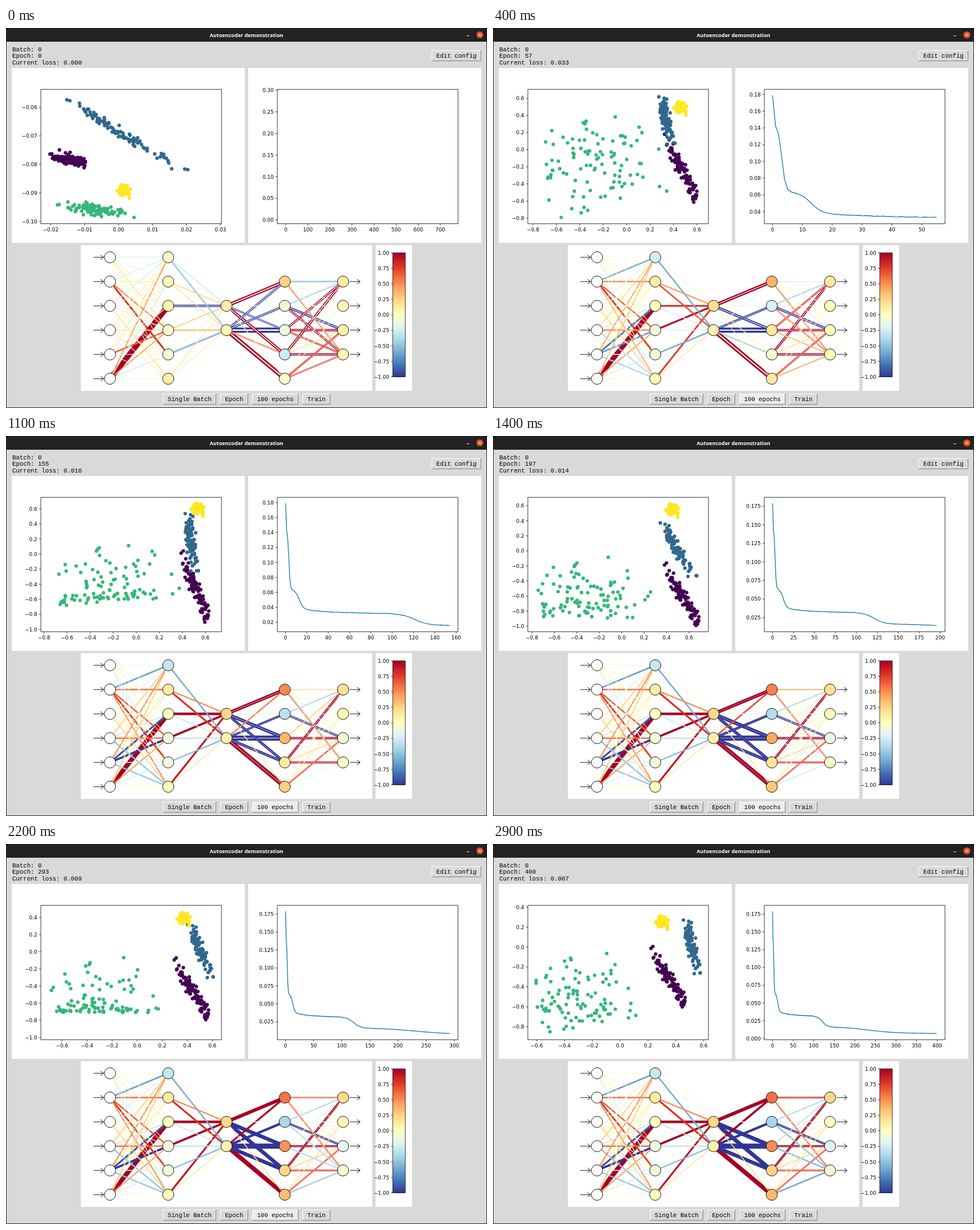
Recreate the animation shown at these times as an HTML page with a canvas. Size 842x665 px, loop 3 s.

```html
<!DOCTYPE html>
<html lang="en">
<head>
<meta charset="utf-8">
<title>Autoencoder demonstration</title>
<style>
html, body { margin: 0; width: 842px; height: 665px; overflow: hidden; background: #d9d9d9; }
canvas, svg { position: absolute; left: 0; top: 0; }
text { font: 10.7px "Liberation Mono", monospace; white-space: pre; }
.title { font: bold 9.1px "Noto Sans", sans-serif; fill: #fff; }
</style>
</head>
<body>
<canvas id="plots" width="842" height="665"></canvas>
<svg id="ui" width="842" height="665">
  <path d="M.5 24V664.5H841.5V24" fill="none" stroke="#222"/>
  <rect width="842" height="24" fill="#000"/>
  <path d="M0 24V6Q0 0 6 0H836Q842 0 842 6V24Z" fill="#222"/>
  <text class="title" x="421" y="16" text-anchor="middle">Autoencoder demonstration</text>
  <path d="M806 13.5h5" stroke="#ddd"/>
  <circle cx="829.5" cy="12" r="6" fill="#e95420"/>
  <path d="M827.3 9.8l4.4 4.4m0-4.4l-4.4 4.4" stroke="#fff"/>
  <text x="11" y="41">Batch: 0</text>
  <text id="epoch" x="11" y="52"></text>
  <text id="loss" x="11" y="63.5"></text>
</svg>
<script>
const $ = id => document.getElementById(id);
const g = $('plots').getContext('2d');
const lerp = (a, b, p) => a + (b - a) * p;
const range = (a, b) => Array.from({ length: b - a + 1 }, (_, i) => a + i);

function rng(seed) {
  return () => {
    seed = seed + 0x6D2B79F5 | 0;
    let t = Math.imul(seed ^ seed >>> 15, 1 | seed);
    t = t + Math.imul(t ^ t >>> 7, 61 | t) ^ t;
    return ((t ^ t >>> 14) >>> 0) / 4294967296;
  };
}

// Linear interpolation between key values, numbers or arrays.
function mix(times, keys, s) {
  let k = 0;
  while (k < times.length - 2 && s >= times[k + 1]) k++;
  const p = Math.max(0, Math.min(1, (s - times[k]) / (times[k + 1] - times[k])));
  const a = keys[k], b = keys[k + 1];
  return Array.isArray(a) ? a.map((v, i) => lerp(v, b[i], p)) : lerp(a, b, p);
}

/* ---- buttons ---- */
function button(label, x, y, w) {
  const h = 19;
  $('ui').insertAdjacentHTML('beforeend',
    `<g><rect x="${x}" y="${y}" width="${w}" height="${h}" fill="#d9d9d9"/>
    <path d="M${x + .5} ${y + h}V${y + .5}H${x + w}" fill="none" stroke="#fff"/>
    <path d="M${x} ${y + h - .5}H${x + w - .5}V${y}" fill="none" stroke="#828282"/>
    <text x="${x + w / 2}" y="${y + 13}" text-anchor="middle">${label}</text></g>`);
  return $('ui').lastElementChild.firstElementChild;
}
button('Edit config', 745, 39, 87);
button('Single Batch', 275, 640, 93);
button('Epoch', 375, 640, 49);
const runButton = button('100 epochs', 431, 640, 81);
button('Train', 519, 640, 49);

/* ---- training progress ---- */
const epochAt = s => Math.ceil(mix([0, 14, 18, 22, 29], [0, 197, 225, 293, 400], s));

// Loss: slow decays plus four smooth drops (height, epoch, softness).
const drops = [[.078, 3.1, .6], [.023, 13, 1.8], [.0148, 121, 6], [.0072, 235, 30]];
const lossAt = e => .0055 + .035 * Math.exp(-4 * e) + .01 * Math.exp(-e / 20) + .006 * Math.exp(-e / 300)
  + drops.reduce((sum, [h, mid, soft]) => sum + h / (1 + Math.exp((e - mid) / soft)), 0);
const jitter = rng(5);
const losses = range(0, 400).map(e => lossAt(e) * (1 + (e > 20 ? (jitter() - .5) * .02 : 0)));

/* ---- axes ---- */
const ink = '#000';
const num = (v, d) => v.toFixed(d).replace(/^-(0\.?0*)$/, '$1').replace('-', '\u2212');

function line(x0, y0, x1, y1, w, color) {
  g.lineWidth = w;
  g.strokeStyle = color;
  g.beginPath();
  g.moveTo(x0, y0);
  g.lineTo(x1, y1);
  g.stroke();
}
function dot(x, y, r, color) {
  g.fillStyle = color;
  g.beginPath();
  g.arc(x, y, r, 0, 7);
  g.fill();
}
function label(s, x, y, align) {
  g.font = '8.85px "DejaVu Sans", sans-serif';
  g.fillStyle = ink;
  g.textAlign = align;
  g.fillText(s, x, y);
}

function ticks(lo, hi) {
  const raw = (hi - lo) / 9, mag = 10 ** Math.floor(Math.log10(raw));
  const m = [1, 2, 2.5, 5, 10].find(m => m * mag >= raw * .9999), step = m * mag;
  const digits = Math.max(0, -Math.floor(Math.log10(step) + 1e-9) + (m === 2.5 && step < 10 ? 1 : 0));
  return range(Math.ceil(lo / step), Math.floor(hi / step)).map(i => [i * step, num(i * step, digits)]);
}

const boxTop = 107, boxBottom = 342.3, boxWidth = 316.2;
function axes(left, [x0, x1, y0, y1]) {
  const X = v => left + (v - x0) / (x1 - x0) * boxWidth;
  const Y = v => boxBottom - (v - y0) / (y1 - y0) * (boxBottom - boxTop);
  for (const [v, s] of ticks(x0, x1)) {
    line(X(v), boxBottom, X(v), boxBottom + 3.2, .75, ink);
    label(s, X(v), boxBottom + 13.2, 'center');
  }
  for (const [v, s] of ticks(y0, y1)) {
    line(left - 3.2, Y(v), left, Y(v), .75, ink);
    label(s, left - 6.4, Y(v) + 3.3, 'right');
  }
  return [X, Y];
}
function frame(left) {
  g.lineWidth = .8;
  g.strokeStyle = ink;
  g.strokeRect(left, boxTop + .3, boxWidth, boxBottom - boxTop);
}

/* ---- scatter ---- */
const limitT = [0, 4, 8, 14, 18, 22, 29];
const limits = [
  [-.0229, .0303, -.1008, -.0536], [-.844, .698, -.863, .707], [-.819, .706, -.985, .797],
  [-.836, .773, -1.072, .714], [-.82, .743, -1.063, .685], [-.769, .673, -1.023, .543], [-.664, .635, -.929, .42]];

// Keys in data units: centre x, y and one deviation along the long axis.
// Thickness in pixels, untrained and trained.
const cloudT = [0, 4, 8, 14, 29];
const clouds = [
  { color: '#440154', thick: [4.5, 4.5], keys: [[-.0143, -.0783, .0026, -.0007], [.478, -.247, .068, -.184], [.489, -.331, .04, -.235], [.554, -.63, .076, -.19], [.36, -.331, .061, -.136]] },
  { color: '#31688e', thick: [4, 4], keys: [[.0008, -.069, .0082, -.0059], [.337, .353, .022, -.13], [.46, .312, -.036, -.197], [.493, .031, .068, -.169], [.516, .013, .023, -.128]] },
  { color: '#35b779', thick: [4.5, 38], tail: [0, 0, 0, .8, .2], keys: [[-.0067, -.0959, .0045, -.0008], [-.254, -.154, .14, 0], [-.148, -.21, .16, .1], [-.306, -.66, .12, 0], [-.29, -.52, .05, 0]] },
  { color: '#fde725', thick: [5, 5], keys: [[.0014, -.0893, 0, 0], [.454, .487, 0, 0], [.609, .653, 0, 0], [.447, .54, 0, 0], [.298, .248, 0, 0]] }];

const rand = rng(21);
const gauss = () => (rand() + rand() + rand() + rand() - 2) * 1.73;
for (const c of clouds) c.points = range(1, 100).map(() => [gauss(), gauss(), gauss()]);

function scatter(s) {
  const [X, Y] = axes(61, mix(limitT, limits, s));
  for (const { color, thick, tail, keys, points } of clouds) {
    const [cx, cy, dx, dy] = mix(cloudT, keys, s);
    const size = lerp(...thick, Math.min(1, s / 4));
    const skew = tail ? mix(cloudT, tail, s) : 0;
    for (const [a, u, v] of points) {
      const x = X(cx + a * dx) + u * size;
      const y = Y(cy + a * dy) + lerp(v, 1 - 1.4 * Math.abs(v), skew) * size;
      dot(Math.max(75.4, Math.min(362.6, x)), Math.max(118, Math.min(331.5, y)), 3.1, color);
    }
  }
  frame(61);
}

/* ---- loss curve ---- */
function lossPlot(epoch) {
  const last = epoch - (epoch < 100 ? 2 : 1);
  if (last < 1) {
    axes(475, [-38, 780, -.0085, .3025]);
  } else {
    const seen = losses.slice(0, last + 1), low = Math.min(...seen), high = seen[0];
    const pad = (high - low) * .05;
    const [X, Y] = axes(475, [-last * .05, last * 1.05, low - pad, high + pad]);
    g.beginPath();
    seen.forEach((v, i) => g.lineTo(X(i), Y(v)));
    g.lineWidth = 1.35;
    g.lineJoin = 'round';
    g.strokeStyle = '#1f77b4';
    g.stroke();
  }
  frame(475);
}

/* ---- network ---- */
const ramp = ['#313695', '#4575b4', '#74add1', '#abd9e9', '#e0f3f8', '#ffffbf', '#fee090', '#fdae61', '#f46d43', '#d73027', '#a50026'];
const rgb = ramp.map(h => [1, 3, 5].map(i => parseInt(h.slice(i, i + 2), 16)));
const rampT = range(0, 10).map(i => i / 5 - 1);
const tone = v => `rgb(${mix(rampT, rgb, v).map(Math.round)})`;

const colX = l => 182 + l * 102, rowY = r => 401.25 + r * 42.5;
const cols = [range(0, 5), range(0, 5), [2, 3], range(1, 5), range(1, 4)];

// strong: from row, to row, first and trained weight; other weights are random.
// bias: first and trained value of each node the layer leads to.
// tau: learning time; hollow: time until the white core has closed.
const layers = [
  { tau: 2.5, hollow: 0,
    strong: [[5, 2, 3.3, 2.8], [1, 4, .8, .75], [1, 3, .5, .65], [1, 1, .1, .6], [1, 0, -.2, -.65], [4, 3, .65, -1], [4, 2, -.2, -.9],
      [5, 0, .45, .3], [5, 3, .45, .45], [3, 3, .15, .6], [4, 5, -.1, -.5], [3, 5, .1, -.5], [1, 5, -.1, .5]],
    bias: [[-.03, -.3], [.03, .12], [.05, 0], [-.04, -.1], [-.07, -.1], [.1, 0]] },
  { tau: 2.5, hollow: 4,
    strong: [[0, 3, -.55, -.6], [1, 3, .2, .8], [2, 2, -1.1, 1.3], [3, 2, .3, 1.1], [3, 3, .4, -.35], [4, 3, -.7, -.55], [5, 2, .15, .9]],
    bias: [[.12, .23], [.04, .08]] },
  { tau: 8, hollow: 18,
    strong: [[2, 1, 2, 2], [3, 1, -1, 1.1], [2, 3, -.9, -2.3], [2, 4, 1.7, -2.4], [3, 2, -1.1, -1.2], [3, 3, -3, -3], [3, 4, .6, -2.2], [3, 5, 2.5, 2.5]],
    bias: [[.25, .6], [-.1, -.42], [-.1, .52], [-.27, .27], [-.02, .36]] },
  { tau: 15, hollow: 60,
    strong: [[1, 1, -.6, 1], [1, 4, .55, .6], [2, 1, -.5, -.4], [2, 3, -1.3, -1], [2, 4, 1, -.8], [3, 1, 1.2, -.6], [3, 3, 1.2, 1],
      [3, 4, .8, -.8], [4, 1, 1.4, 1], [4, 4, 1.2, .6], [5, 3, .8, .65], [5, 4, .75, -.9]],
    bias: [[.12, .25], [.03, 0], [.1, -.25], [.05, -.1]] }];

const weak = rng(8);
layers.forEach((layer, l) => {
  layer.edges = cols[l].flatMap(i => cols[l + 1].map(j => {
    const first = (weak() - .5) * .5, drift = (weak() - .42) * .6;
    return layer.strong.find(e => e[0] === i && e[1] === j) || [i, j, first, first + drift];
  }));
});

function arrow(x, y) {
  line(x, y, x + 18, y, .9, ink);
  g.beginPath();
  g.moveTo(x + 12.5, y - 4);
  g.lineTo(x + 18, y);
  g.lineTo(x + 12.5, y + 4);
  g.stroke();
}
function node(l, row, color) {
  dot(colX(l), rowY(row), 9.8, color);
  g.lineWidth = .9;
  g.strokeStyle = ink;
  g.stroke();
}

function network(s) {
  const learnt = tau => 1 - Math.exp(-s / tau);
  layers.forEach(({ tau, hollow, edges }, l) => {
    const core = hollow ? .28 * Math.max(0, 1 - s / hollow) : 0;
    edges.map(([i, j, a, b]) => [i, j, lerp(a, b, learnt(tau))])
      .sort((p, q) => Math.abs(q[2]) - Math.abs(p[2]))
      .forEach(([i, j, v]) => {
        const ends = [colX(l), rowY(i), colX(l + 1), rowY(j)], w = 1 + 2.6 * Math.abs(v);
        line(...ends, w, tone(v));
        if (core && Math.abs(v) > .4) line(...ends, w * core, '#fff');
      });
  });
  for (const row of cols[0]) {
    node(0, row, '#fff');
    arrow(153, rowY(row));
  }
  layers.forEach(({ tau, bias }, l) => cols[l + 1].forEach((row, n) =>
    node(l + 1, row, tone(lerp(...bias[n], learnt(tau))))));
  for (const row of cols[4]) arrow(602, rowY(row));
}

function colorbar() {
  const y0 = 393.5, h = 217, grad = g.createLinearGradient(0, y0 + h, 0, y0);
  ramp.forEach((c, i) => grad.addColorStop(i / 10, c));
  g.fillStyle = grad;
  g.fillRect(677, y0, 22, h);
  g.lineWidth = .8;
  g.strokeStyle = ink;
  g.strokeRect(677, y0, 22, h);
  for (const i of range(-4, 4)) {
    const y = y0 + h * (4 - i) / 8;
    line(674, y, 677, y, .75, ink);
    label(num(i / 4, 2), 670.8, y + 3.3, 'right');
  }
}

/* ---- playback ---- */
function draw(s) {
  const epoch = epochAt(s);
  $('epoch').textContent = `Epoch: ${epoch}`;
  $('loss').textContent = `Current loss: ${(epoch ? losses[epoch - 1] : 0).toFixed(3)}`;
  runButton.setAttribute('fill', s > 0 && s < 28 ? '#ececec' : '#d9d9d9');
  g.fillStyle = '#d9d9d9';
  g.fillRect(0, 0, 842, 665);
  g.fillStyle = '#fff';
  for (const r of [[10, 70, 408, 306], [424, 70, 408, 306], [131, 380, 510, 255], [647, 380, 64, 255]]) g.fillRect(...r);
  scatter(s);
  lossPlot(epoch);
  network(s);
  colorbar();
}

let shown = -1;
function tick() {
  const s = Math.floor(performance.now() % 3000 / 100);
  if (s !== shown) draw(shown = s);
  requestAnimationFrame(tick);
}
tick();
</script>
</body>
</html>
```
